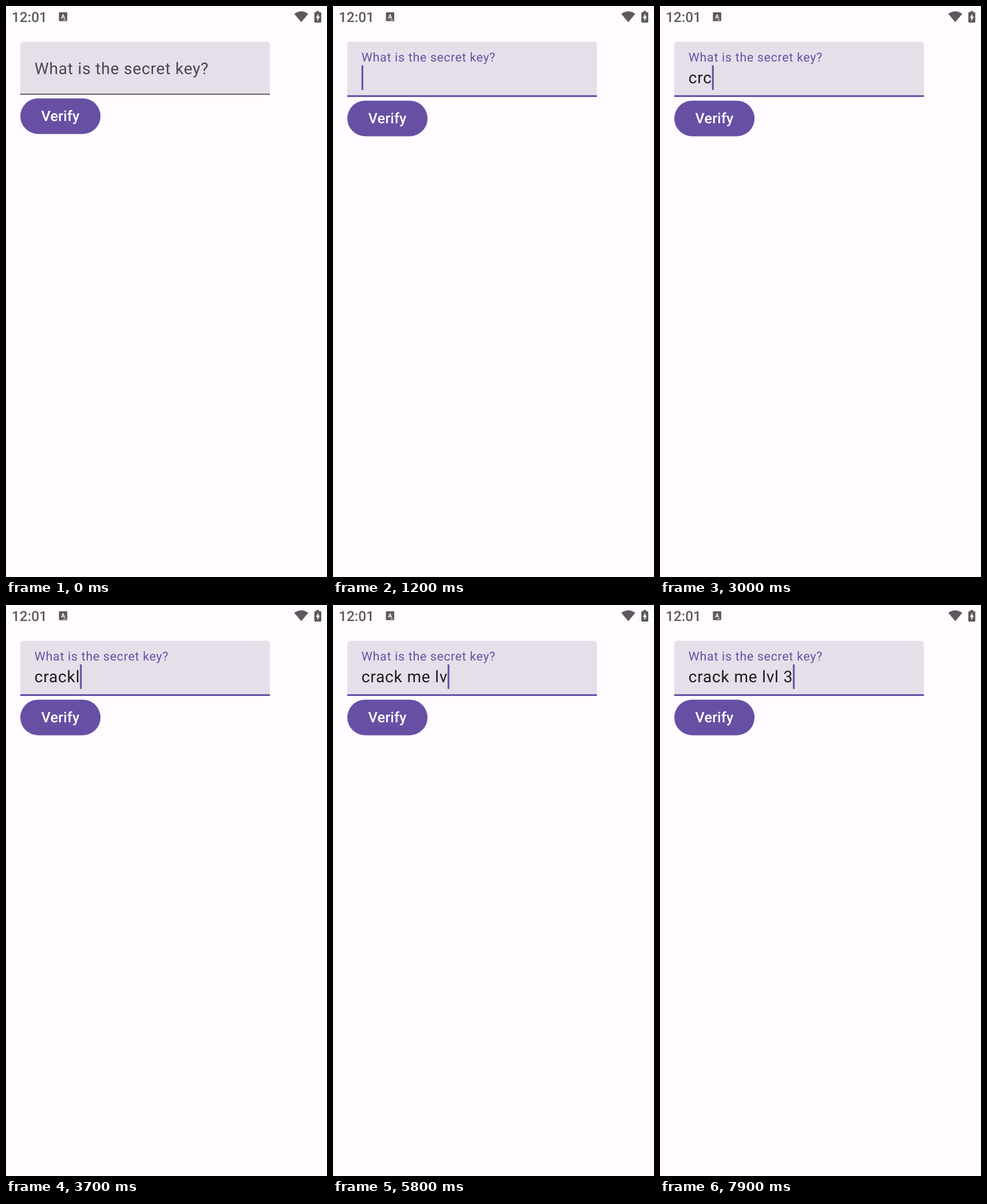
An HTML page for the animation above (8 s loop, 561 by 998 pixels).

```html
<!DOCTYPE html>
<html lang="en">
<head>
<meta charset="utf-8">
<title>Secret key form</title>
<style>
  html, body { margin: 0; width: 100%; height: 100%; overflow: hidden; background: #fffbfe; }
  svg { display: block; }
  text { font-family: Roboto, sans-serif; text-rendering: geometricPrecision; white-space: pre; }
  #typed { font-size: 28.1px; letter-spacing: .79px; fill: #1c1b1f; }
  .status { fill: #5c5a5e; }
</style>
</head>
<body>
<svg width="561" height="998" viewBox="0 0 561 998">
  <g class="status">
    <text x="10" y="27.7" font-size="24.4" font-weight="500">12:01</text>
    <rect x="92.5" y="11" width="14.5" height="15.5" rx="1"/>
    <text x="99.7" y="22" font-size="10.5" font-weight="700" text-anchor="middle" style="fill:#fffbfe">A</text>
    <path d="M100 24.2h5" stroke="#fffbfe" stroke-width="1"/>
    <path d="M503.8 13.8Q516 4.6 528.2 13.8L516 28.2Z"/>
    <path d="M542.3 8.8h5v2.2h2.3q1.4 0 1.4 1.4v15.2q0 1.4-1.4 1.4h-9.4q-1.4 0-1.4-1.4v-15.2q0-1.4 1.4-1.4h2.1z"/>
    <path d="M546 13.5v5h2.6l-4.6 8v-5.8h-2.6z" fill="#fffbfe"/>
  </g>
  <path id="box" fill="#e6dfea"/>
  <rect id="line" x="25" width="436.2"/>
  <text id="label" x="49.8">What is the secret key?</text>
  <text id="typed" x="49.8" y="135"></text>
  <rect id="caret" y="103.7" width="3.1" height="43" fill="#6750a4"/>
  <g id="button">
    <rect x="25" y="161.4" width="140.2" height="62.3" rx="31.15" fill="#6750a4"/>
    <text x="95.1" y="201" font-size="25.3" font-weight="500" letter-spacing=".15" text-anchor="middle" fill="#fff">Verify</text>
  </g>
</svg>
<script>
const LOOP = 8000, STEP = 100, BLINK = 500;
const $ = id => document.getElementById(id);
const [box, line, label, typed, caret, button] =
  ['box', 'line', 'label', 'typed', 'caret', 'button'].map($);

// [time, field content]; each edit restarts the caret blink
const edits = [
  [200, ''], [1700, 'c'], [2100, 'cr'], [2300, 'crc'], [2600, 'crca'],
  [3000, 'crc'], [3100, 'cr'], [3200, 'cra'], [3400, 'crac'], [3500, 'crack'],
  [3600, 'crackl'], [4200, 'crack'], [4400, 'crack '], [4700, 'crack m'],
  [4800, 'crack me'], [5000, 'crack me '], [5600, 'crack me l'],
  [5800, 'crack me lv'], [5900, 'crack me lvl'], [6800, 'crack me lvl '],
  [6900, 'crack me lvl 3']
];

const mix = (a, b, p) => a + (b - a) * p;
const mixColor = (a, b, p) => `rgb(${a.map((v, i) => Math.round(mix(v, b[i], p)))})`;
const smooth = p => p * p * (3 - 2 * p);
const set = (el, attrs) => {
  for (const key in attrs) el.setAttribute(key, attrs[key]);
};

function draw(t) {
  const focus = smooth(Math.min(1, Math.max(0, (t - 50) / 200)));
  const bottom = mix(155, 159, focus);
  const thick = mix(1.6, 3.1, focus);
  const tint = mixColor([73, 69, 79], [103, 80, 164], focus);

  set(box, { d: `M25 ${bottom}V68q0-5.5 5.5-5.5H455.7q5.5 0 5.5 5.5V${bottom}Z` });
  set(line, { y: bottom - thick, height: thick, fill: tint });
  set(label, {
    y: mix(118.5, 97, focus),
    'font-size': mix(28.1, 21.5, focus),
    'letter-spacing': mix(.79, .66, focus),
    fill: tint
  });
  set(button, { transform: `translate(0 ${mix(0, 4, focus)})` });

  const edit = edits.findLast(e => e[0] <= t);
  typed.textContent = edit ? edit[1].replaceAll(' ', '\u00a0') : '';
  const lit = edit && Math.floor((t - edit[0]) / BLINK) % 2 === 0;
  const width = typed.textContent ? typed.getComputedTextLength() : 0;
  set(caret, { x: 49.8 + width, opacity: lit ? 1 : 0 });
}

const start = performance.now();
function tick() {
  const t = (performance.now() - start) % LOOP;
  draw(Math.floor(t / STEP) * STEP);
  requestAnimationFrame(tick);
}
tick();
</script>
</body>
</html>
```
